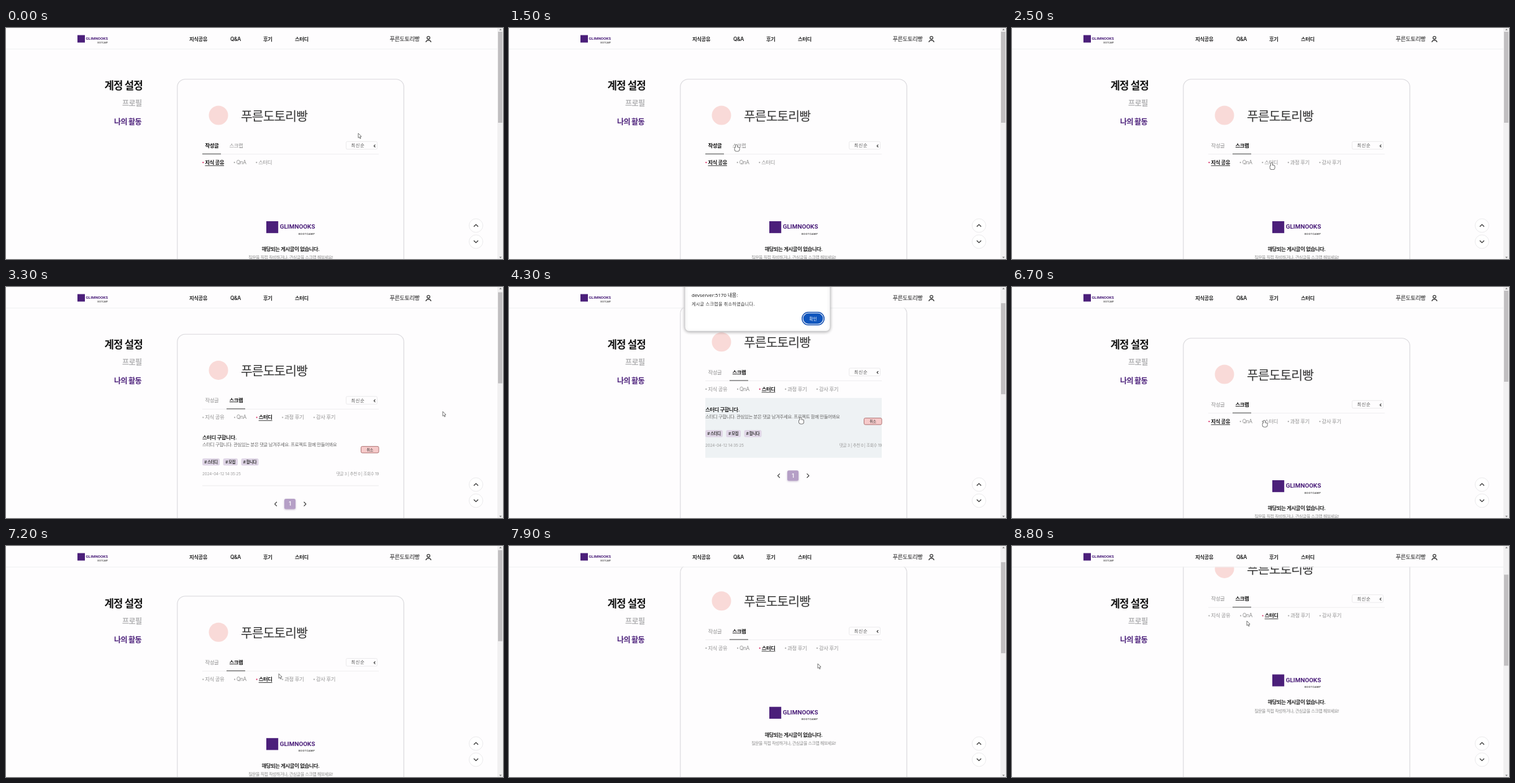
An HTML page with a canvas for the animation above (9100 ms loop, 800x373 px).

```html
<!DOCTYPE html>
<html lang="ko">
<head>
<meta charset="utf-8">
<title>나의 활동</title>
<style>
html, body { margin: 0; width: 100%; height: 100%; overflow: hidden; background: #fefdfe; }
canvas { display: block; width: 800px; height: 373px; }
</style>
</head>
<body>
<canvas id="stage"></canvas>
<script>
const W = 800, H = 373, LOOP = 9100, STEP = 100;
const canvas = document.getElementById('stage');
const ctx = canvas.getContext('2d');
const ratio = window.devicePixelRatio || 1;
canvas.width = W * ratio;
canvas.height = H * ratio;

const SANS = 'Inter, "Noto Sans CJK KR", "Noto Sans CJK", sans-serif';
const DIALOG = '"Noto Sans", "Noto Sans CJK KR", "Noto Sans CJK", sans-serif';
const BG = '#fefdfe', PURPLE = '#4b1f7a', INK = '#222', GRAY = '#8f8f8f';
const USER = '푸른도토리빵';

// Moments at which a click takes effect
const TAB = 1600, STUDY = 2800, ALERT = 4100, CONFIRM = 4900, RELOAD = 5000, TAB2 = 6200, STUDY2 = 6800;

// Pointer legs: from time, to time, end point
const legs = [
  [100, 500, 440, 222], [800, 1000, 345, 189], [1100, 1500, 366, 188.5],
  [1600, 2000, 539, 196], [2100, 2500, 418, 218], [2700, 3300, 703, 201],
  [3300, 3700, 588, 222], [3700, 4000, 585, 216], [4100, 4300, 469.5, 210.5],
  [4300, 4700, 489, 50], [4800, 5900, 370, 187], [6200, 6500, 406, 215.5],
  [6800, 7900, 497, 190], [7900, 8600, 354, 267], [8600, 8800, 378, 121]
];
const NOTCH = 52.3, GLIDE = 450;

const within = (t, a, b) => t >= a && t < b;
const progress = (t, a, b) => Math.min(1, Math.max(0, (t - a) / (b - a)));
const smooth = f => f * f * (3 - 2 * f);

function pointerAt(t) {
  let x = 567, y = 170;
  for (const [from, to, tx, ty] of legs) {
    const f = progress(t, from, to);
    x += (tx - x) * f;
    y += (ty - y) * f;
  }
  return [x, y];
}

function scrollAt(t) {
  const wheel = t < RELOAD ? [3200] : [7150, 8050];
  return wheel.reduce((sum, at) => sum + NOTCH * smooth(progress(t, at, at + GLIDE)), 0);
}

// cy is the vertical middle of the glyphs
function text(str, x, cy, size, color, { weight = 400, align = 'left', track = -0.05, family = SANS } = {}) {
  ctx.font = `${weight} ${size}px ${family}`;
  ctx.letterSpacing = track * size + 'px';
  ctx.textAlign = align;
  ctx.fillStyle = color;
  ctx.fillText(str, x, cy + size * 0.37);
  return ctx.measureText(str).width;
}

function rect(x, y, w, h, color) {
  ctx.fillStyle = color;
  ctx.fillRect(x, y, w, h);
}

function box(x, y, w, h, r, fill, stroke, line = 1) {
  ctx.beginPath();
  ctx.roundRect(x, y, w, h, r);
  if (fill) { ctx.fillStyle = fill; ctx.fill(); }
  if (stroke) { ctx.strokeStyle = stroke; ctx.lineWidth = line; ctx.stroke(); }
}

function disc(x, y, r, fill, stroke, line) {
  box(x - r, y - r, 2 * r, 2 * r, r, fill, stroke, line);
}

function shadowed(color, blur, paint) {
  ctx.save();
  ctx.shadowColor = color;
  ctx.shadowBlur = blur * ratio;
  ctx.shadowOffsetY = ratio;
  paint();
  ctx.restore();
}

// dx, dy: from the tip to the end of one arm
function chevron(x, y, dx, dy, line = 1.1) {
  const horizontal = Math.abs(dx) > Math.abs(dy);
  ctx.beginPath();
  ctx.moveTo(x + dx, y + dy);
  ctx.lineTo(x, y);
  ctx.lineTo(horizontal ? x - dx : x + dx, horizontal ? y + dy : y - dy);
  ctx.strokeStyle = '#333';
  ctx.lineWidth = line;
  ctx.stroke();
}

function logo(x, y, k) {
  const family = 'Roboto, sans-serif';
  rect(x, y, 12 * k, 12 * k, PURPLE);
  text('GLIMNOOKS', x + 13.6 * k, y + 5.5 * k, 6.2 * k, PURPLE, { weight: 700, track: 0, family });
  text('BOOTCAMP', x + 49 * k, y + 12.5 * k, 2.6 * k, '#333', { weight: 500, align: 'right', track: 0.12, family });
}

function header() {
  rect(0, 0, 791, 33.5, BG);
  rect(0, 33.5, 791, 1, '#f0eff1');
  logo(115, 11.5, 1);
  const nav = [['지식공유', 295], ['Q&A', 361], ['후기', 414], ['스터디', 465]];
  nav.forEach(([s, x]) => text(s, x, 18, 8.4, INK, { weight: 600 }));
  text(USER, 665.5, 18, 9.2, INK, { align: 'right', weight: 500 });
  disc(680, 15.8, 2.3, null, INK, 1.1);
  ctx.beginPath();
  ctx.moveTo(676, 23);
  ctx.bezierCurveTo(676, 18.8, 684, 18.8, 684, 23);
  ctx.stroke();
}

function sidebar() {
  text('계정 설정', 158.6, 93, 16.7, '#111', { weight: 700 });
  text('프로필', 187, 122, 12, '#b4b4b6', { weight: 700 });
  text('나의 활동', 174, 151.5, 12, PURPLE, { weight: 700 });
}

function tabs(scrap, study) {
  rect(316, 203.3, 284, 1, '#efeef0');
  [['작성글', 316, !scrap], ['스크랩', 355, scrap]].forEach(([s, x, on]) => {
    text(s, x + 4.5, 189.8, 8.4, on ? '#111' : GRAY, { weight: on ? 600 : 400 });
    if (on) rect(x, 202.8, 30, 1.1, '#555');
  });

  box(547.5, 183.3, 50, 12.5, 2, BG, '#ebeaec');
  text('최신순', 555.5, 189.5, 7.2, '#555', { track: 0.1 });
  chevron(592.3, 190.4, 2.1, -2.1);

  const subs = ['지식 공유', 'QnA', '스터디'];
  if (scrap) subs.push('과정 후기', '강사 후기');
  let x = 316;
  subs.forEach((s, i) => {
    const on = i === (study ? 2 : 0);
    disc(x + 1.3, 217.2, 1.1, on ? '#d8336a' : '#aaa');
    const w = text(s, x + 4.3, 216.8, 8.4, on ? '#111' : GRAY, { weight: on ? 700 : 400 });
    if (on) rect(x + 4.3, 221.8, w, 1, '#444');
    x += w + 19.7;
  });
}

function emptyList() {
  logo(419, 312, 1.6);
  text('해당되는 게시글이 없습니다.', 458, 356.7, 8.4, INK, { align: 'center', weight: 600 });
  text('질문을 직접 작성하거나, 관심글을 스크랩 해보세요!', 458.3, 370.7, 6.85, '#888', { align: 'center' });
}

function studyList(hover) {
  if (hover) rect(316, 231.5, 284, 96.5, '#eef2f4');
  else rect(316, 327, 284, 1, '#ebebed');
  text('스터디 구합니다.', 316, 249.8, 8.4, INK, { weight: 600 });
  text('스터디 구합니다. 관심있는 분은 댓글 남겨주세요. 프로젝트 함께 만들어봐요', 316, 261.2, 7.4, '#666');
  box(571.5, 264, 28.5, 10.5, 2, '#f6caca', '#b07474');
  text('취소', 585.7, 269.3, 6, '#333', { align: 'center', weight: 500 });
  let x = 316;
  ['스터디', '모집', '합니다'].forEach(tag => {
    const w = 14.5 + 4.5 * tag.length;
    box(x, 283.3, w, 11.6, 2.5, '#dfd5e6');
    text('# ' + tag, x + w / 2, 289, 6.3, '#333', { align: 'center', weight: 600 });
    x += w + 5.5;
  });
  text('2024-04-12 14:35:25', 316, 308.3, 6.2, '#999', { track: 0 });
  text('댓글 3 | 추천 0 | 조회수 19', 600, 308.3, 6.6, '#999', { align: 'right' });

  chevron(432.6, 357, 3.3, 3.4);
  chevron(482.8, 357, -3.3, 3.4);
  shadowed('rgba(80,50,110,.35)', 3, () => box(448, 348.5, 18, 16.5, 2.5, '#b59fc6'));
  text('1', 457, 356.8, 8.6, '#fff', { align: 'center', weight: 600, track: 0 });
}

function scrollButtons() {
  [[319, -1], [345, 1]].forEach(([y, dir]) => {
    disc(756.5, y, 11, '#fff', '#ebeaec');
    chevron(756.5, y + 1.7 * dir, 3.5, -3.4 * dir, 1.2);
  });
}

function scrollbar(scroll) {
  rect(791, 0, 9, H, '#f1f0f1');
  rect(792, 6 + scroll * 0.385, 7, 147, '#c1bfc1');
  [[1.2, 1], [H - 1.2, -1]].forEach(([y, dir]) => {
    ctx.beginPath();
    ctx.moveTo(796, y);
    ctx.lineTo(798, y + 2.4 * dir);
    ctx.lineTo(794, y + 2.4 * dir);
    ctx.fillStyle = '#777';
    ctx.fill();
  });
}

function dialog() {
  shadowed('rgba(0,0,0,.3)', 5, () => box(283, -10, 234, 81.5, 7, '#fff', '#c9c9cc', 0.8));
  text('devserver:5170 내용:', 294, 12.8, 7.8, INK, { track: 0, family: DIALOG });
  text('게시글 스크랩을 취소하였습니다.', 294, 27.8, 7, '#333', { track: 0.05, family: DIALOG });
  box(471.8, 40.8, 35.4, 20.4, 10.2, '#fff', '#1c56b4', 1.6);
  box(473.6, 42.6, 31.8, 16.8, 8.4, '#0f55bd');
  text('확인', 489.5, 51, 6.8, '#fff', { align: 'center', track: 0, family: DIALOG });
}

function pointer(x, y, hand) {
  ctx.save();
  ctx.translate(x, y);
  ctx.lineJoin = 'round';
  ctx.fillStyle = '#fff';
  ctx.strokeStyle = '#555';
  ctx.beginPath();
  if (hand) {
    ctx.roundRect(-1, 0, 2, 6, 1);
    ctx.roundRect(-2.5, 4, 7.2, 6.2, [1.5, 1.5, 2.6, 2.6]);
    ctx.lineWidth = 1.6;
    ctx.stroke();
    ctx.fill();
  } else {
    const outline = [[0, 0], [0, 7.4], [1.7, 6], [2.9, 8.6], [4.1, 8.1], [3, 5.5], [5.1, 5.2]];
    outline.forEach(p => ctx.lineTo(...p));
    ctx.closePath();
    ctx.lineWidth = 0.8;
    ctx.fill();
    ctx.stroke();
  }
  ctx.restore();
}

function draw(t) {
  const scroll = scrollAt(t);
  const [px, py] = pointerAt(t);
  const scrap = within(t, TAB, RELOAD) || t >= TAB2;
  const listed = within(t, STUDY, RELOAD);
  const study = listed || t >= STUDY2;
  const alert = within(t, ALERT, CONFIRM);

  const over = (x0, x1, y0, y1) => within(px, x0, x1) && within(py + scroll, y0, y1);
  const onCard = listed && over(316, 600, 231, 328);
  const onLink = over(350, 385, 183, 203) || over(403, 430, 211, 224);

  ctx.setTransform(ratio, 0, 0, ratio, 0, 0);
  rect(0, 0, W, H, BG);
  sidebar();

  ctx.save();
  ctx.translate(0, -scroll);
  box(275.8, 82.8, 364.6, 500, 12.5, null, '#d9d8dc', 1.1);
  disc(342, 141, 15.5, '#f9dad8');
  text(USER, 378, 142, 20.5, '#333');
  tabs(scrap, study);
  if (listed) studyList(onCard || alert);
  else emptyList();
  ctx.restore();

  header();
  scrollButtons();
  scrollbar(scroll);
  if (alert) dialog();
  pointer(px, py, onCard || onLink);
}

let start;
function frame(now) {
  if (start === undefined) start = now;
  const t = (now - start) % LOOP;
  draw(Math.floor(t / STEP) * STEP);
  requestAnimationFrame(frame);
}
requestAnimationFrame(frame);
</script>
</body>
</html>
```
